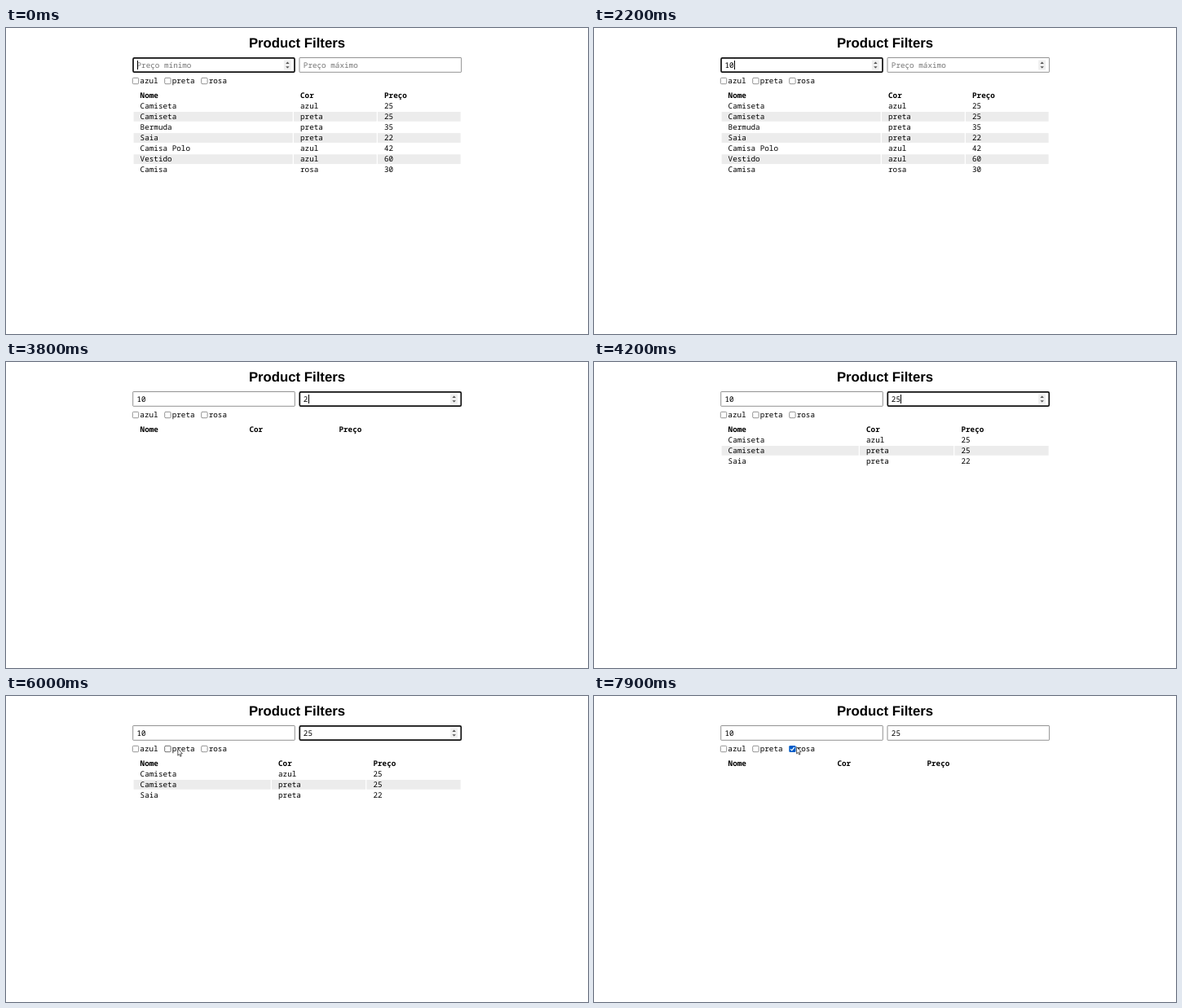
An HTML page with a canvas that plays this animation: 714x376 px, repeating every 8 s.

```html
<!DOCTYPE html>
<html lang="pt">
<head>
<meta charset="utf-8">
<title>Product Filters</title>
<style>
html, body { margin: 0; width: 100%; height: 100%; overflow: hidden; background: #fff; }
canvas { display: block; width: 714px; height: 376px; }
</style>
</head>
<body>
<canvas id="stage"></canvas>
<script>
const W = 714, H = 376, LOOP = 8000, STEP = 100;
const CHAR = 5.58, FONT = '9.3px "Noto Sans Mono", monospace';
const canvas = document.getElementById('stage');
const ctx = canvas.getContext('2d');
const dpr = window.devicePixelRatio || 1;
canvas.width = W * dpr;
canvas.height = H * dpr;

const products = [
  ['Camiseta', 'azul', 25], ['Camiseta', 'preta', 25], ['Bermuda', 'preta', 35],
  ['Saia', 'preta', 22], ['Camisa Polo', 'azul', 42], ['Vestido', 'azul', 60],
  ['Camisa', 'rosa', 30]
];
const boxes = [['azul', 154.9], ['preta', 194.3], ['rosa', 239.3]];

// Pointer visits: each run is a list of [ms, x, y]; between runs it is hidden.
const runs = [
  { end: 2100, path: [[1900, 400, 65], [2000, 404, 66]] },
  { end: LOOP, path: [[5000, 440, 68], [5100, 381, 92], [5200, 313, 103], [5300, 274, 98],
    [5500, 228, 76], [5700, 213, 66], [6000, 210.5, 64.5], [6300, 208.5, 64.5],
    [7300, 208.5, 64.5], [7500, 222, 65], [7700, 246, 62], [7800, 248.3, 62.3]] }
];

const within = (t, a, b) => t >= a && t < b;

function pointerAt(t) {
  const run = runs.find(r => within(t, r.path[0][0], r.end));
  if (!run) return null;
  const i = run.path.findIndex(p => p[0] > t);
  if (i < 0) return run.path[run.path.length - 1].slice(1);
  const a = run.path[i - 1], b = run.path[i];
  const k = (t - a[0]) / (b[0] - a[0]);
  return [a[1] + (b[1] - a[1]) * k, a[2] + (b[2] - a[2]) * k];
}

function stateAt(t) {
  return {
    min: t < 800 ? '' : t < 1100 ? '1' : '10',
    max: t < 3800 ? '' : t < 4200 ? '2' : '25',
    focus: t < 2900 ? 'min' : t < 6300 ? 'max' : '',
    hoverMax: within(t, 2100, 5000),
    caret: t < 500 || within(t, 800, 1600) || within(t, 2100, 2700) ||
      within(t, 2900, 3400) || within(t, 3800, 4700) || within(t, 5200, 5700),
    color: within(t, 6400, 7300) ? 'preta' : t >= 7800 ? 'rosa' : '',
    pointer: pointerAt(t)
  };
}

function text(str, x, y, color = '#000', font = FONT) {
  ctx.font = font;
  ctx.fillStyle = color;
  ctx.fillText(str, x, y);
}

function polygon(points) {
  ctx.beginPath();
  points.forEach(([x, y]) => ctx.lineTo(x, y));
  ctx.closePath();
}

function frame(x, y, w, h, r, color, line) {
  ctx.beginPath();
  ctx.roundRect(x, y, w, h, r);
  ctx.strokeStyle = color;
  ctx.lineWidth = line;
  ctx.stroke();
}

function spinner(x) {
  ctx.fillStyle = '#efefef';
  ctx.fillRect(x - 4.5, 39.5, 9, 12);
  ctx.fillStyle = '#505050';
  polygon([[x - 2.2, 44], [x, 41.6], [x + 2.2, 44]]);
  ctx.fill();
  polygon([[x - 2.2, 47.2], [x, 49.6], [x + 2.2, 47.2]]);
  ctx.fill();
}

function field(x, value, hint, focused, hovered, caret) {
  if (focused) frame(x + 0.8, 36.8, 198, 17.4, 1.4, '#101010', 1.7);
  else frame(x + 0.5, 36.5, 198.6, 17.8, 0.6, '#767676', 0.8);
  if (focused || hovered) spinner(x + 190.2);
  const tx = x + 5.3;
  text(value || hint, tx, 49, value ? '#000' : '#757575');
  if (focused && caret) {
    ctx.fillStyle = '#000';
    ctx.fillRect(Math.round(tx + 0.2 + value.length * CHAR), 40, 1, 11);
  }
}

function checkbox(label, x, checked, hovered) {
  if (checked) {
    ctx.fillStyle = hovered ? '#005cc8' : '#0075ff';
    ctx.beginPath();
    ctx.roundRect(x, 60.9, 8.2, 8.2, 1.4);
    ctx.fill();
    ctx.beginPath();
    ctx.moveTo(x + 1.8, 65.2);
    ctx.lineTo(x + 3.4, 66.8);
    ctx.lineTo(x + 6.5, 63);
    ctx.strokeStyle = '#fff';
    ctx.lineWidth = 1.2;
    ctx.stroke();
  } else {
    frame(x + 0.4, 61.3, 7.4, 7.4, 1.3, hovered ? '#4a4a4a' : '#767676', 0.8);
  }
  text(label, x + 9.4, 68.3);
}

function table(rows) {
  const cols = rows.length > 3 ? [164.6, 361, 464]
    : rows.length ? [164.6, 334, 450.4] : [164.6, 298.4, 408.4];
  const line = (cells, y, font) => cells.forEach((c, i) => text(c, cols[i], y, '#000', font));
  line(['Nome', 'Cor', 'Preço'], 85.9, 'bold ' + FONT);
  rows.forEach((row, i) => {
    const mid = 95.8 + i * 13.08;
    if (i % 2) {
      ctx.fillStyle = '#ececec';
      cols.forEach((c, j) => {
        const left = c - 8;
        const right = j < 2 ? cols[j + 1] - 9.3 : 557.6;
        ctx.fillRect(left, mid - 5.9, right - left, 11.8);
      });
    }
    line(row, mid + 3.2);
  });
}

function arrow([x, y]) {
  ctx.save();
  ctx.translate(x, y);
  polygon([[0.3, 0.3], [0.3, 8.6], [2.1, 7], [3.4, 9.8], [4.7, 9.2], [3.5, 6.5], [5.9, 6.3]]);
  ctx.fillStyle = '#fff';
  ctx.fill();
  ctx.strokeStyle = '#222';
  ctx.lineWidth = 0.75;
  ctx.stroke();
  ctx.restore();
}

function draw(t) {
  const s = stateAt(t);
  ctx.setTransform(dpr, 0, 0, dpr, 0, 0);
  ctx.textRendering = 'geometricPrecision';
  ctx.fillStyle = '#fff';
  ctx.fillRect(0, 0, W, H);

  ctx.textAlign = 'center';
  text('Product Filters', 357, 23.8, '#000', 'bold 16.75px "Liberation Sans", Arial, sans-serif');
  ctx.textAlign = 'left';

  field(155.2, s.min, 'Preço mínimo', s.focus === 'min', false, s.caret);
  field(359.5, s.max, 'Preço máximo', s.focus === 'max', s.hoverMax, s.caret);

  const p = s.pointer;
  boxes.forEach(([label, x]) => {
    const end = x + 9.4 + label.length * CHAR;
    const hovered = !!p && p[0] >= x && p[0] < end && p[1] > 59 && p[1] < 71;
    checkbox(label, x, s.color === label, hovered);
  });

  const max = s.max ? +s.max : Infinity;
  table(products.filter(([, color, price]) =>
    price >= +s.min && price <= max && (!s.color || color === s.color)));
  if (p) arrow(p);
}

const start = performance.now();
function tick() {
  const t = (performance.now() - start) % LOOP;
  draw(Math.floor(t / STEP) * STEP);
  requestAnimationFrame(tick);
}
tick();
</script>
</body>
</html>
```
